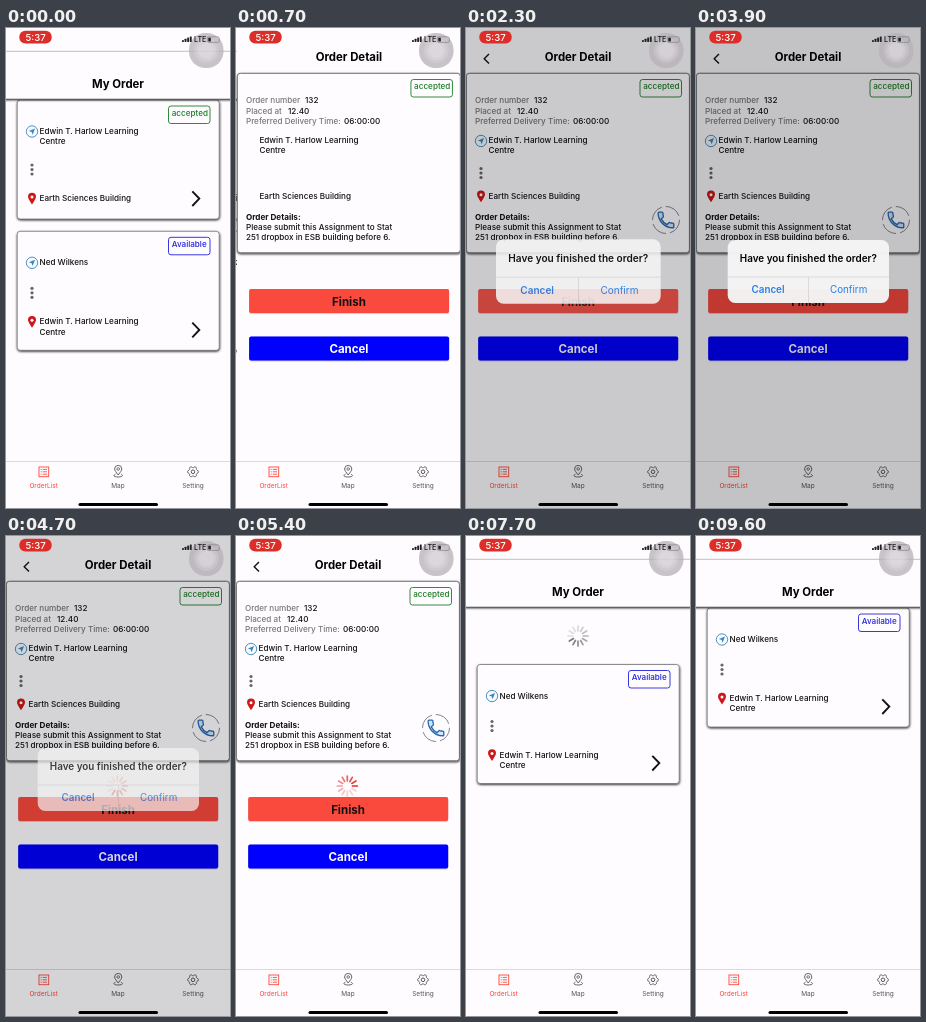
These frames come from a looping animation (224x480 px, 9700 ms). An HTML page:

```html
<!DOCTYPE html>
<html lang="en">
<head>
<meta charset="utf-8">
<title>Order app</title>
<style>
html, body { margin: 0; width: 100%; height: 100%; overflow: hidden; background: #fefcff; }
svg { display: block; width: 100vw; height: 100vh; }
text { font-family: Inter, Roboto, sans-serif; font-size: 8.15px; font-weight: 450; fill: #111; white-space: pre; }
</style>
</head>
<body>
<svg id="stage" viewBox="0 0 224 480"></svg>
<script>
const LOOP = 9700, STEP = 100, WIDTH = 224;
const PLACE = ['Edwin T. Harlow Learning', 'Centre'];
const PAPER = '#fefcff', RED = '#fa483c', BLUE = '#0000fe', GREY = '#555';

const rect = (x, y, w, h, fill, more = '') =>
  `<rect x="${x}" y="${y}" width="${w}" height="${h}" fill="${fill}" ${more}/>`;
const line = (points, color, width, more = '') =>
  `<polyline points="${points}" fill="none" stroke="${color}" stroke-width="${width}" ${more}/>`;
const text = (x, y, str, more = '') => `<text x="${x}" y="${y}" ${more}>${str}</text>`;
const mid = (x, y, str, size, weight = 400, fill = '#000') =>
  text(x, y, str, `text-anchor="middle" style="font-size:${size}px;font-weight:${weight};fill:${fill}"`);
const lines = (x, y, rows, gap = 10.3) => rows.map((row, i) => text(x, y + i * gap, row)).join('');
const group = (id, body, more = '') => `<g id="${id}" ${more}>${body}</g>`;

const compass = (x, y) =>
  `<g transform="translate(${x} ${y})"><circle r="5.7" fill="#f4faff" stroke="#3f86b8" stroke-width=".9"/>
   <path d="M3-3L.6 3.2-.3.4-3.1-.5z" fill="#3f86b8"/></g>`;
const pin = (x, y) =>
  `<g transform="translate(${x} ${y})"><path d="M0 5.600C-2 2.600-4-.2-4-2a4 4 0 0 1 8 0C4-.2 2 2.600 0 5.600z" fill="#cf1717"/>
   <circle cy="-1.900" r="1.500" fill="#fff"/></g>`;
const dots = (x, y) => [-4.5, 0, 4.5].map(d =>
  `<circle cx="${x}" cy="${y + d}" r="1.6" fill="#666"/>`).join('');
const badge = (x, y, str, color) =>
  rect(x, y, 41.5, 17.5, PAPER, `rx="2.5" stroke="${color}" stroke-width=".9"`) +
  text(x + 3.2, y + 9.9, str, `style="fill:${color}"`);

function card(id, from, to, state, color) {
  const lift = from.length > 1 ? 0 : 8;
  return group(id,
    rect(11.2, 72, 202, 119, PAPER, 'rx="3" stroke="#666" stroke-width=".7" filter="url(#shade)"') +
    badge(162.5, 78, state, color) +
    compass(26, 103.5) + lines(33.5, 106, from) +
    dots(26, 141.5 - lift) +
    pin(26, 170.8 - lift) + lines(33.5, 173 - lift, to) +
    line('186.300,163.300 193.300,170.600 186.300,178', '#111', 1.9));
}

function spokes(id, x, y, color) {
  let s = '';
  for (let i = 0; i < 12; i++)
    s += `<line y1="-5.200" y2="-10" transform="rotate(${i * 30})"/>`;
  return group(id, s, `transform="translate(${x} ${y})" stroke="${color}" stroke-width="1.700" stroke-linecap="round"`);
}

function gear(x, y) {
  let p = '';
  for (let i = 0; i <= 96; i++) {
    const a = i * Math.PI / 48;
    const r = 4.8 + 0.6 * Math.tanh(2 * Math.cos(6 * a));
    p += `${(x + r * Math.cos(a)).toFixed(2)},${(y + r * Math.sin(a)).toFixed(2)} `;
  }
  return line(p, GREY, 1) + `<circle cx="${x}" cy="${y}" r="1.8" fill="none" stroke="${GREY}" stroke-width="1"/>`;
}

const button = (y, str, fill, ink) =>
  rect(12.2, y, 200, 24, fill, 'rx="2" filter="url(#soft)"') + mid(112, y + 16.7, str, 11.5, 700, ink);
const field = (y, name, x, value) =>
  text(9, y, name, 'style="fill:#777"') + text(x, y, value);

const list = group('list',
  rect(0, 0, WIDTH, 434, PAPER) +
  group('cards',
    card('first', PLACE, ['Earth Sciences Building'], 'accepted', '#1b7d25') +
    card('second', ['Ned Wilkens'], PLACE, 'Available', '#2222dd')) +
  spokes('refresh', 112, 100, '#777') +
  rect(0, 0, WIDTH, 24, PAPER) +
  rect(-3, 23.5, 230, 47.5, PAPER, 'stroke="#999" stroke-width=".4" filter="url(#shade)"') +
  line('0,71.300 224,71.300', '#555', 0.9) +
  mid(112, 59.6, 'My Order', 11.4, 700));

const detail = group('detail',
  rect(0, 0, WIDTH, 434, PAPER) +
  mid(112, 33.4, 'Order Detail', 11.4, 700) +
  rect(0.4, 45.3, 223, 179.5, PAPER, 'rx="3" stroke="#666" stroke-width=".9" filter="url(#shade)"') +
  badge(174, 51.5, 'accepted', '#1b7d25') +
  field(75, 'Order number', 68, '132') +
  field(85.6, 'Placed at', 51, '12.40') +
  field(95.7, 'Preferred Delivery Time:', 107, '06:00:00') +
  lines(22.5, 115, PLACE) +
  text(22.5, 171, 'Earth Sciences Building') +
  text(9, 191.8, 'Order Details:', 'style="font-weight:700"') +
  lines(9, 202, ['Please submit this Assignment to Stat', '251 dropbox in ESB building before 6.']) +
  group('icons',
    line('23,26 18.200,30.800 23,35.600', '#111', 1.4) +
    compass(15, 113) + dots(15, 145) + pin(15, 168.6) +
    `<circle cx="200" cy="192" r="13.500" fill="none" stroke="#667" stroke-width=".8" stroke-dasharray="17 4"/>
     <path transform="translate(189.500 181.500) scale(.87)" fill="#cfe6fb" stroke="#2767ad" stroke-width="1.500"
      d="M6.600 10.800c1.400 2.800 3.800 5.100 6.600 6.600l2.200-2.200c.3-.3.7-.4 1-.2 1.100.4 2.300.6 3.600.6.6 0 1 .4 1 1V20c0 .6-.4 1-1 1C10.600 21 3 13.400 3 4c0-.6.4-1 1-1h3.500c.6 0 1 .4 1 1 0 1.300.2 2.500.6 3.600.1.3 0 .7-.2 1z"/>`) +
  group('finish', button(261, 'Finish', RED, '#111')) +
  button(308.5, 'Cancel', BLUE, '#fff') +
  spokes('busy', 111.3, 250, '#dc2f27'));

const tabs =
  rect(0, 433, WIDTH, 47, PAPER) + line('0,433.500 224,433.500', '#ccc', 0.7) +
  rect(33, 439, 9.7, 9.7, 'none', `stroke="${RED}" stroke-width=".9"`) +
  [441.4, 443.8, 446.2].map(y => line(`34.700,${y} 35.700,${y}`, RED, 0.9) + line(`36.700,${y} 41,${y}`, RED, 0.9)).join('') +
  `<path d="M112.200 447C110 444 108.600 442.500 108.600 441a3.600 3.600 0 0 1 7.200 0C115.800 442.500 114.400 444 112.200 447zM109.500 446.200C106.500 447.400 108 449 112.200 449s5.700-1.600 2.700-2.800" fill="none" stroke="${GREY}" stroke-width=".9"/>
   <circle cx="112.200" cy="441" r="1.300" fill="none" stroke="${GREY}" stroke-width=".8"/>` +
  gear(187, 443.8) +
  mid(37.6, 460.2, 'OrderList', 6.5, 400, RED) +
  mid(112, 460.2, 'Map', 6.5, 400, GREY) +
  mid(187, 460.2, 'Setting', 6.5, 400, GREY) +
  rect(72.5, 475.1, 79.5, 3, '#000', 'rx="1.500"');

const alertBox = group('alert',
  rect(31.7, 212, 161.3, 63, '#f5f5f5', 'rx="7.500" fill-opacity=".97"') +
  `<path id="press" d="M112.500 249H193V267.500a7.500 7.500 0 0 1-7.500 7.500H112.500z" fill="#dadada"/>` +
  line('31.700,249 193,249', '#cacaca', 0.6) + line('112.500,249 112.500,275', '#cacaca', 0.6) +
  mid(112.3, 234, 'Have you finished the order?', 9.9, 600) +
  mid(72, 265.2, 'Cancel', 9.8, 600, '#287fe6') +
  mid(152.6, 265.2, 'Confirm', 9.8, 400, '#287fe6'));

const status =
  rect(13.3, 2.7, 32.4, 12.8, '#dc2e29', 'rx="6"') + mid(29.6, 12.7, '5:37', 9.6, 500, '#fff') +
  rect(183, 5, 34.5, 35, '#b9b3ba', 'rx="16.500" fill-opacity=".78"') +
  [12.5, 10, 7.5].map(r =>
    `<circle cx="200.300" cy="22.500" r="${r}" fill="#fff" fill-opacity=".14"/>`).join('') +
  [0, 1, 2, 3].map(i => rect(176 + i * 2.6, 12 - i * 1.2, 1.9, 2 + i * 1.2, '#222', 'rx=".4"')).join('') +
  text(188, 14.2, 'LTE', 'style="font-size:7.200px;font-weight:500"') +
  rect(201.3, 8.8, 12, 5.6, 'none', 'rx="1.600" stroke="#777" stroke-width=".6"') +
  rect(202.3, 9.7, 2.6, 3.8, '#222', 'rx=".6"');

const stage = document.getElementById('stage');
stage.innerHTML = `<defs>
  <filter id="shade" x="-5%" y="-10%" width="110%" height="120%">
    <feDropShadow dx=".3" dy="1" stdDeviation="1.1" flood-color="#000" flood-opacity=".85"/></filter>
  <filter id="soft" x="-5%" y="-20%" width="110%" height="140%">
    <feDropShadow dx="0" dy=".5" stdDeviation=".5" flood-color="#000" flood-opacity=".35"/></filter>
  </defs>` + list + detail + tabs +
  rect(0, 0, WIDTH, 480, '#000', 'id="dim"') + alertBox + status;

const el = {};
stage.querySelectorAll('[id]').forEach(n => el[n.id] = n);

const clamp = v => Math.max(0, Math.min(1, v));
const ease = (t, a, b) => { const u = clamp((t - a) / (b - a)); return u * u * (3 - 2 * u); };
// Critically damped spring, from 1 at the start down to 0
const settle = (t, start) => {
  const u = Math.max(0, t - start) * 0.0153;
  return u > 9 ? 0 : (1 + u) * Math.exp(-u);
};
const show = (node, on) => node.setAttribute('display', on ? 'inline' : 'none');
const fade = (node, v) => { show(node, v > 0.001); node.setAttribute('opacity', v); };
const move = (node, x, y) => node.setAttribute('transform', `translate(${x} ${y})`);

function spin(node, t, shown = 12) {
  const head = Math.floor(t * 12 / 1000);
  [...node.children].forEach((s, i) => {
    const age = (((head - i) % 12) + 12) % 12;
    s.setAttribute('opacity', i < shown ? Math.max(0.22, 1 - age * 0.09) : 0);
  });
}

function draw(t) {
  const away = t < 5800 ? settle(t, 200) : 1 - settle(t, 5900);
  move(el.detail, WIDTH * away, 0);
  show(el.detail, away < 1);
  move(el.list, -0.3 * WIDTH * (1 - away), 0);
  show(el.icons, t >= 850);

  const pull = 56.5 * (ease(t, 7050, 7450) - ease(t, 7700, 8000));
  const updated = t >= 7700;
  move(el.cards, 0, pull);
  show(el.first, !updated);
  move(el.second, 0, updated ? 0 : 131.3);
  fade(el.refresh, clamp((pull - 12) / 30));
  spin(el.refresh, t, t < 7450 ? Math.round(pull / 56.5 * 12) : 12);

  fade(el.finish, 1 - 0.6 * (ease(t, 1850, 1950) - ease(t, 2040, 2380)));

  const open = (1 - settle(t, 2050)) * (1 - ease(t, 4600, 4880));
  const scale = 1 + 0.2 * settle(t, 2050);
  fade(el.dim, 0.23 * open);
  fade(el.alert, open);
  el.alert.setAttribute('transform', `translate(112.400 243.500) scale(${scale}) translate(-112.400 -243.500)`);
  show(el.press, t >= 4400 && t < 4700);

  show(el.busy, t >= 4700);
  spin(el.busy, t - 5100);
}

function tick() {
  draw(Math.floor(performance.now() % LOOP / STEP) * STEP);
  requestAnimationFrame(tick);
}
tick();
</script>
</body>
</html>
```
